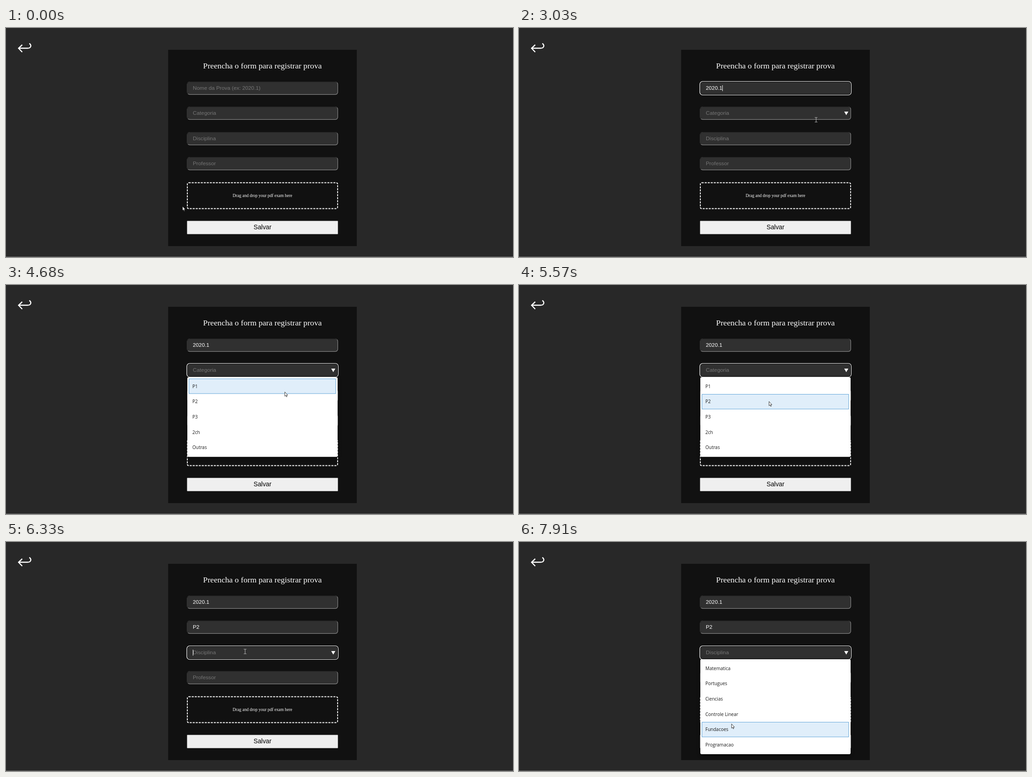
Recreate the animation shown at these times as an HTML page with a canvas. Size 1110 px wide and 504 px high, loop 8 s.

```html
<!DOCTYPE html>
<html lang="pt">
<head>
<meta charset="utf-8">
<title>Registrar prova</title>
<style>
  html, body { margin: 0; height: 100%; overflow: hidden; background: #282828; }
  canvas { display: block; }
</style>
</head>
<body>
<canvas id="stage" width="1110" height="504"></canvas>
<script>
const ctx = document.getElementById('stage').getContext('2d');
const LOOP = 8000;
const SERIF = '"Liberation Serif", serif';
const SANS = '"Liberation Sans", sans-serif';
const MENU = '"Open Sans", sans-serif';
const LEFT = 396.5, WIDTH = 330.5, FIELD_H = 29, ROW_H = 33.65;

const fields = [
  { top: 118, hint: 'Nome da Prova (ex: 2020.1)' },
  { top: 173, hint: 'Categoria', options: ['P1', 'P2', 'P3', '2ch', 'Outras'] },
  { top: 229, hint: 'Disciplina', options: ['Matematica', 'Portugues', 'Ciencias',
    'Controle Linear', 'Fundacoes', 'Programacao'] },
  { top: 284, hint: 'Professor' },
];

// Pointer steps: time, x, y
const pointer = [
  [0, 386, 392], [150, 402, 327], [290, 437, 242], [430, 450, 182],
  [580, 470, 140], [700, 475, 136], [820, 478, 135], [945, 478, 135], [1070, 640, 201],
  [1460, 700, 206], [1590, 767, 225], [1720, 650, 202], [2000, 650, 202],
  [2150, 650, 202], [2650, 650, 202], [2900, 650, 202], [3030, 650, 202],
  [3560, 660, 197], [3680, 665, 193], [3940, 665, 193], [4060, 660, 198],
  [4180, 652, 205], [4300, 640, 212], [4440, 625, 222], [4565, 610, 235],
  [4690, 595, 246], [4815, 580, 262], [4940, 567, 256], [5080, 562, 252],
  [5200, 558, 251], [5320, 553, 253], [5450, 550, 255], [5570, 547, 256],
  [5820, 547, 258.5], [6210, 523, 241], [6480, 520, 244], [6610, 515, 255],
  [6735, 508, 268], [6860, 502, 285], [7010, 494, 327], [7140, 490, 357],
  [7290, 482, 385], [7420, 475, 405], [7540, 470, 422], [7660, 468, 428],
  [7780, 467, 418], [7910, 465, 400],
];

// Form changes; "edit" ones restart the caret blink
const changes = [
  { at: 945, focus: 0, edit: true },
  { at: 1720, value: '2', edit: true },
  { at: 2000, value: '202', edit: true },
  { at: 2150, value: '2020', edit: true },
  { at: 2900, value: '2020.', edit: true },
  { at: 3030, value: '2020.1', edit: true },
  { at: 3810, focus: 1, edit: true },
  { at: 3940, open: true },
  { at: 5820, value: 'P2', open: false, edit: true },
  { at: 6330, focus: 2, edit: true },
  { at: 6480, open: true },
];

function stateAt(time) {
  const state = { focus: -1, open: false, values: ['', '', '', ''], caret: false };
  const [start, x, y] = pointer.findLast(step => step[0] <= time);
  let step = start, edited = 0;
  for (const c of changes) {
    if (c.at > time) break;
    step = Math.max(step, c.at);
    if (c.focus !== undefined) state.focus = c.focus;
    if (c.value !== undefined) state.values[state.focus] = c.value;
    if (c.open !== undefined) state.open = c.open;
    if (c.edit) edited = c.at;
  }
  state.caret = Math.floor((step - edited) / 500) % 2 === 0;
  return Object.assign(state, { x, y });
}

function box(x, y, w, h, r, color) {
  ctx.fillStyle = color;
  ctx.beginPath();
  ctx.roundRect(x, y, w, h, r);
  ctx.fill();
}

function poly(points, color) {
  ctx.fillStyle = color;
  ctx.beginPath();
  points.forEach(p => ctx.lineTo(...p));
  ctx.closePath();
  ctx.fill();
}

function text(str, x, y, font, color, align = 'left') {
  ctx.font = font;
  ctx.fillStyle = color;
  ctx.textAlign = align;
  ctx.fillText(str, x, y);
}

function drawBackArrow() {
  ctx.strokeStyle = '#fff';
  ctx.lineWidth = 2.4;
  ctx.stroke(new Path2D('M35.5 37 L27.5 44.5 L35.5 53 M28 44.5 H47 C55 44.5 56.5 38 51 34'));
}

function drawField(field, value, focused, hovered, caret) {
  const { top } = field;
  if (focused) {
    box(LEFT - 1.3, top - 1, WIDTH + 2.4, FIELD_H + 2, 7, '#f4f4f4');
    box(LEFT, top, WIDTH, FIELD_H, 6, '#141414');
  } else {
    box(LEFT, top, WIDTH, FIELD_H, 6, '#858585');
    ctx.save();
    ctx.beginPath();
    ctx.moveTo(LEFT, top + FIELD_H);
    ctx.lineTo(LEFT + 14, top + FIELD_H - 14);
    ctx.lineTo(LEFT + WIDTH - 14, top + 14);
    ctx.lineTo(LEFT + WIDTH, top);
    ctx.lineTo(LEFT, top);
    ctx.clip();
    box(LEFT, top, WIDTH, FIELD_H, 6, '#262626');
    ctx.restore();
  }
  box(LEFT + 1.2, top + 1.2, WIDTH - 2.4, FIELD_H - 2.4, 5, '#303030');
  text(value || field.hint, 409, top + 18, `11.8px ${SANS}`, value ? '#fff' : '#757575');
  if (focused && caret) {
    const x = 409 + ctx.measureText(value).width;
    box(x, top + 8, 1, 13, 0, '#fff');
  }
  if (field.options && (focused || hovered)) {
    poly([[712, top + 11], [721, top + 11], [716.5, top + 18.7]], '#fff');
  }
}

function drawDropZone() {
  ctx.strokeStyle = '#fff';
  ctx.lineWidth = 1.8;
  ctx.setLineDash([4.4, 2.2]);
  ctx.beginPath();
  ctx.roundRect(397, 340.5, 329, 57, 3);
  ctx.stroke();
  ctx.setLineDash([]);
  text('Drag and drop your pdf exam here', 561.5, 372, `9.45px ${SERIF}`, '#fff', 'center');
}

function drawMenu(field, pointerY) {
  const top = field.top + FIELD_H + (field.top === 173 ? 1 : 0);
  const height = field.options.length * ROW_H + 7;
  ctx.save();
  ctx.shadowColor = 'rgba(0,0,0,.6)';
  ctx.shadowBlur = 7;
  ctx.shadowOffsetY = 2;
  box(397, top, 329, height, 3, '#fff');
  ctx.restore();
  field.options.forEach((option, i) => {
    const y = top + 3.3 + i * ROW_H;
    if (pointerY >= y && pointerY < y + ROW_H) {
      box(400, Math.round(y), 322.5, 33.5, 1.5, '#62a5da');
      box(401, Math.round(y) + 1, 320.5, 31.5, 1, '#e0eefa');
    }
    text(option, 408, y + 20.3, `10px ${MENU}`, '#1a1a1a');
  });
}

function drawPointer(x, y, overField) {
  ctx.save();
  ctx.translate(x, y);
  if (overField) {
    ctx.strokeStyle = '#b4b4b4';
    ctx.lineWidth = 1;
    ctx.stroke(new Path2D('M-2.5 -5 H3.5 M.5 -5 V5 M-2.5 5 H3.5'));
  } else {
    const arrow = new Path2D('M.4 .4 V9.8 L2.5 7.9 L4 11.2 L5.4 10.6 L4 7.4 H6.8 Z');
    ctx.fillStyle = '#fff';
    ctx.strokeStyle = '#111';
    ctx.lineWidth = 0.8;
    ctx.fill(arrow);
    ctx.stroke(arrow);
  }
  ctx.restore();
}

function draw(time) {
  const s = stateAt(time);
  const active = fields[s.focus];
  const hovered = fields.findIndex(f => s.x >= LEFT && s.x <= LEFT + WIDTH &&
    s.y >= f.top && s.y <= f.top + FIELD_H);
  const overMenu = s.open && s.y > active.top + FIELD_H;

  box(0, 0, 1110, 504, 0, '#282828');
  box(0, 503, 1110, 1, 0, '#686868');
  drawBackArrow();
  box(355, 48, 413, 432, 0, '#111');
  text('Preencha o form para registrar prova', 561.5, 89, `17.7px ${SERIF}`, '#fff', 'center');
  fields.forEach((field, i) =>
    drawField(field, s.values[i], i === s.focus, i === hovered && !overMenu, s.caret));
  drawDropZone();
  box(396.3, 424.5, 330.5, 29.3, 1, '#cfcfcf');
  box(397, 425, 329, 28, 0, '#efefef');
  text('Salvar', 561.5, 443, `13.8px ${SANS}`, '#000', 'center');
  if (s.open) drawMenu(active, s.y);
  drawPointer(s.x, s.y, hovered >= 0 && !overMenu);
}

function tick() {
  draw(performance.now() % LOOP);
  requestAnimationFrame(tick);
}
tick();
</script>
</body>
</html>
```
